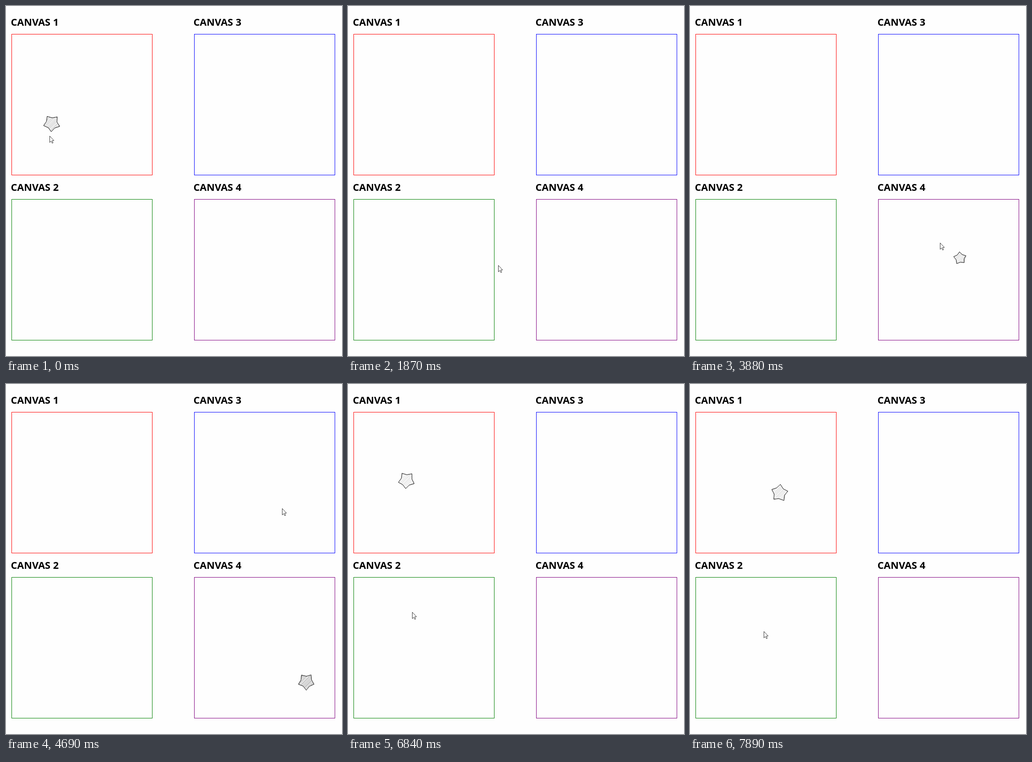
These frames come from a looping animation (734 px wide and 763 px high, 8000 ms). An HTML page with a canvas:

```html
<!DOCTYPE html>
<html lang="en">
<head>
<meta charset="utf-8">
<title>Four canvases</title>
<style>
  html, body { margin: 0; width: 100%; height: 100%; overflow: hidden; background: #fefefe; }
  svg, canvas { position: absolute; left: 0; top: 0; display: block; }
  text { font: 700 21.7px "Open Sans", "Noto Sans", sans-serif; fill: #000; }
  rect { fill: none; stroke-width: 1; }
</style>
</head>
<body>
<svg width="734" height="763">
  <text x="10.5" y="43">CANVAS 1</text>
  <text x="10.5" y="403">CANVAS 2</text>
  <text x="409.5" y="43">CANVAS 3</text>
  <text x="409.5" y="403">CANVAS 4</text>
  <rect x="12.5" y="61.5" width="307" height="307" stroke="red"/>
  <rect x="12.5" y="421.5" width="307" height="307" stroke="green"/>
  <rect x="411.5" y="61.5" width="307" height="307" stroke="blue"/>
  <rect x="411.5" y="421.5" width="307" height="307" stroke="purple"/>
</svg>
<canvas id="stage" width="734" height="763"></canvas>
<script>
const ctx = document.getElementById('stage').getContext('2d');
const LOOP = 8000, STEP = 135, TAU = Math.PI * 2;
const CENTER = [365, 355];

// Pointer and shape circle around the center; laps are whole turns before arriving
const stops = [
  { t: 0, pointer: [95, 283], shape: [100, 256], tilt: 93, size: 18.3, hatch: .36 },
  { t: 810, pointer: [127, 551], shape: [115.5, 470], tilt: 150, size: 17, hatch: 0, triangle: true },
  { t: 2960, pointer: [449, 447], shape: [527, 427], tilt: 234, size: 10.4, hatch: 0 },
  { t: 4410, pointer: [640, 560], shape: [600, 690], tilt: 290, size: 17, hatch: .5 },
  { t: 4690, pointer: [603, 271], shape: [656, 649], tilt: 306, size: 18, hatch: .6 },
  { t: 5200, pointer: [330, 165], shape: [480, 230], tilt: 340, size: 18, hatch: .3 },
  { t: 5670, pointer: [112, 474], shape: [160.5, 142], tilt: 366, size: 18.4, hatch: 0 },
  { t: 6840, pointer: [140, 497], shape: [127.5, 210], tilt: 455, size: 18.3, hatch: .2, laps: 1 },
  { t: 7890, pointer: [161, 539], shape: [195.5, 237.5], tilt: 492, size: 18.5, hatch: .24, laps: 1 }
];
stops.push({ ...stops[stops.length - 1], t: LOOP, laps: 0 });

const mix = (a, b, u) => a + (b - a) * u;

function polar([x, y]) {
  const dx = x - CENTER[0], dy = y - CENTER[1];
  return [Math.atan2(dy, dx), Math.hypot(dx, dy)];
}

// Shortest way round plus whole laps, tightening on wide sweeps
function orbit(from, to, laps, u) {
  const [a, r] = polar(from), [b, s] = polar(to);
  const sweep = Math.atan2(Math.sin(b - a), Math.cos(b - a)) - laps * TAU;
  const tight = 1 - .25 * Math.abs(sweep) / TAU * Math.sin(Math.PI * u);
  const angle = a + sweep * u, radius = mix(r, s, u) * tight;
  return [CENTER[0] + radius * Math.cos(angle), CENTER[1] + radius * Math.sin(angle)];
}

// State of the scene, held for about STEP ms at a time
function sceneAt(t) {
  const i = stops.findIndex(s => s.t > t) - 1;
  const from = stops[i], to = stops[i + 1], span = to.t - from.t;
  const count = Math.round(span / STEP) || 1;
  const index = Math.floor((t - from.t) / span * count);
  const u = index / count, laps = to.laps || 0;
  const eased = laps ? u ** 1.6 : u;
  return {
    seed: i * 50 + index,
    pointer: orbit(from.pointer, to.pointer, laps, eased),
    shape: orbit(from.shape, to.shape, laps, eased),
    tilt: mix(from.tilt, to.tilt, u),
    size: mix(from.size, to.size, u),
    hatch: mix(from.hatch, to.hatch, u),
    triangle: (u < .5 ? from : to).triangle
  };
}

function random(seed) {
  let s = seed * 7919 + 17;
  return () => (s = (s * 16807 + 11) % 2147483647) / 2147483647;
}

function trace(points, wobble = () => 0) {
  ctx.beginPath();
  points.forEach(([x, y]) => ctx.lineTo(x + wobble(), y + wobble()));
  ctx.closePath();
}

function starPoints(x, y, r, degrees) {
  return Array.from({ length: 10 }, (_, i) => {
    const a = degrees * Math.PI / 180 + i * TAU / 10;
    const d = i % 2 ? r * .66 : r;
    return [x + d * Math.cos(a), y + d * Math.sin(a)];
  });
}

function fillHatch(points, x, y, strength, rnd) {
  ctx.save();
  trace(points);
  ctx.clip();
  ctx.strokeStyle = `rgba(0,0,0,${strength})`;
  ctx.lineWidth = .9;
  ctx.beginPath();
  for (let d = -40; d <= 40; d += 3.4) {
    const k = d + rnd() - .5;
    ctx.moveTo(x + k - 20, y + 20);
    ctx.lineTo(x + k + 20, y - 20);
  }
  ctx.stroke();
  ctx.restore();
}

function sketch(points, rnd) {
  ctx.strokeStyle = 'rgba(20,20,20,.85)';
  ctx.lineWidth = .8;
  for (let pass = 0; pass < 2; pass++) {
    trace(points, () => (rnd() - .5) * 1.1);
    ctx.stroke();
  }
}

function drawShape({ seed, shape: [x, y], tilt, size, hatch, triangle }) {
  const rnd = random(seed);
  const points = triangle
    ? [[x, y - 14], [x + 7, y + 13], [x - 7.3, y + 13]]
    : starPoints(x, y, size, tilt);
  ctx.save();
  ctx.beginPath();
  for (const left of [13, 412])
    for (const top of [62, 422]) ctx.rect(left, top, 306, 306);
  ctx.clip();
  if (triangle || size < 12) {
    trace(points);
    ctx.fillStyle = triangle ? '#f7f7f7' : '#fbeee8';
    ctx.fill();
  } else if (hatch) {
    fillHatch(points, x, y, hatch, rnd);
  }
  sketch(points, rnd);
  ctx.restore();
}

function drawPointer({ pointer }) {
  const [x, y] = pointer.map(Math.round);
  const arrow = [[0, 0], [0, 14], [3, 11], [5.4, 15.6], [7.4, 14.7], [5.2, 10.2], [9.2, 9.8]];
  trace(arrow.map(([dx, dy]) => [x + dx + .5, y + dy + .5]));
  ctx.fillStyle = '#fff';
  ctx.fill();
  ctx.strokeStyle = '#222';
  ctx.lineWidth = .9;
  ctx.stroke();
}

const begin = performance.now();
function draw() {
  const scene = sceneAt((performance.now() - begin) % LOOP);
  ctx.clearRect(0, 0, 734, 763);
  drawShape(scene);
  drawPointer(scene);
  requestAnimationFrame(draw);
}
draw();
</script>
</body>
</html>
```
